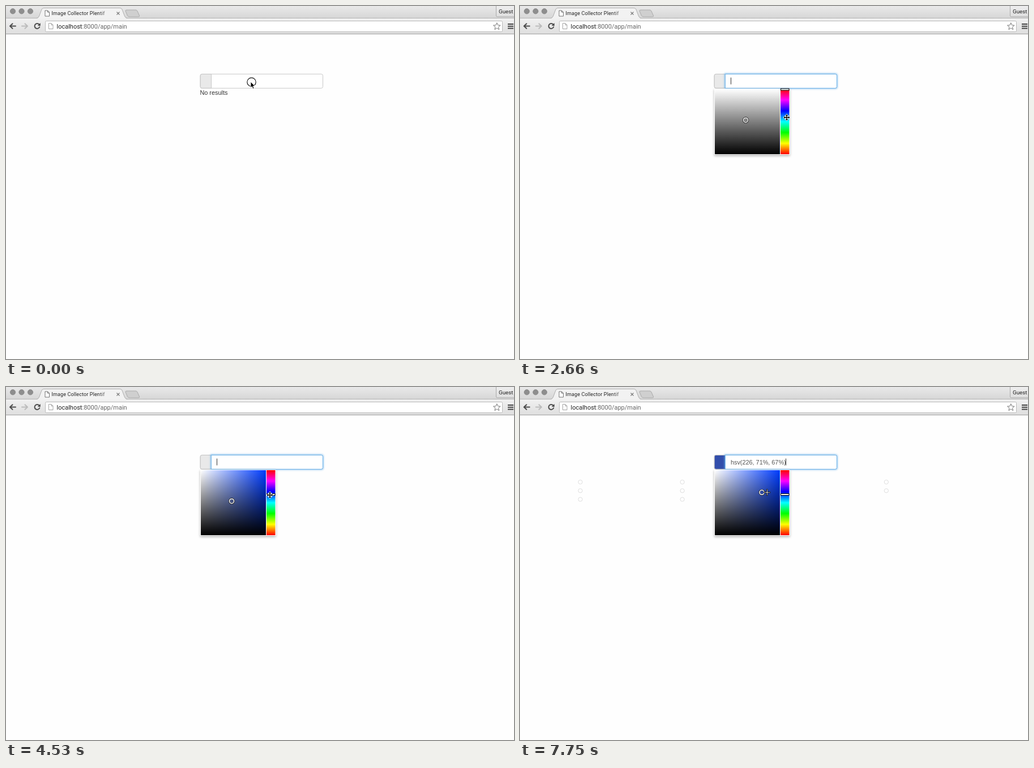
An HTML page that plays this animation: 897 by 624 pixels, repeating every 8000 ms.

```html
<!DOCTYPE html>
<html lang="en">
<head>
<meta charset="utf-8">
<title>Colour search</title>
<style>
html, body { margin: 0; width: 100%; height: 100%; overflow: hidden; background: #fefefe; }
svg { display: block; width: 897px; height: 624px; }
.ui { font-family: Roboto, Inter, sans-serif; }
.page { font: 10.85px "Liberation Sans", Arial, sans-serif; }
.line { fill: none; stroke-linecap: round; stroke-linejoin: round; }
</style>
</head>
<body>
<svg viewBox="0 0 897 624">
  <defs>
    <linearGradient id="strip" x2="0" y2="1"><stop stop-color="#e9e9e9"/><stop offset="1" stop-color="#d6d6d6"/></linearGradient>
    <linearGradient id="bar" x2="0" y2="1"><stop stop-color="#f1f1f1"/><stop offset="1" stop-color="#dedede"/></linearGradient>
    <linearGradient id="fade" gradientUnits="userSpaceOnUse" x1="164" x2="189" y1="0" y2="0"><stop stop-color="#222"/><stop offset="1" stop-color="#222" stop-opacity="0"/></linearGradient>
    <linearGradient id="value" x2="0" y2="1"><stop stop-opacity="0"/><stop offset="1"/></linearGradient>
    <linearGradient id="sat"><stop stop-color="#fff"/><stop id="pure" offset="1" stop-color="#fff"/></linearGradient>
    <linearGradient id="hues" x2="0" y2="1"></linearGradient>
    <filter id="shadow" x="-20%" y="-20%" width="140%" height="140%"><feDropShadow dx="0" dy="2" stdDeviation="2.2" flood-opacity=".3"/></filter>
    <filter id="glow" x="-10%" y="-50%" width="120%" height="200%"><feGaussianBlur stdDeviation="1.7"/></filter>
    <path id="sheet" d="M.5.5H5L8 3.5V10.5H.5ZM5 .5V3.5H8"/>
  </defs>
  <rect width="897" height="624" fill="#fefefe"/>

  <g id="browser" class="ui">
    <rect width="897" height="22" fill="url(#strip)"/>
    <g fill="#8e8e8e" stroke="#7c7c7c" stroke-width=".6"><circle cx="12" cy="9.3" r="4.7"/><circle cx="27.5" cy="9.3" r="4.7"/><circle cx="43" cy="9.3" r="4.7"/></g>
    <path d="M211 9Q210.500 7 213 7H229Q231 7 232 9L235.500 17Q236 19 234 19H218Q215.500 19 214.500 17Z" fill="#cfcfcf" stroke="#a6a6a6" stroke-width=".9"/>
    <rect y="21.500" width="897" height="28" fill="url(#bar)"/>
    <path d="M0 21.500H897" stroke="#b4b4b4"/>
    <path d="M54 22Q57 21.500 58.500 18L63 6Q64 3.500 67 3.500H201Q204 3.500 205 6L209.500 18Q211 21.500 214 22Z" fill="#f2f2f2"/>
    <path d="M54 21.500Q57 21.500 58.500 18L63 6Q64 3.500 67 3.500H201Q204 3.500 205 6L209.500 18Q211 21.500 214 21.500" fill="none" stroke="#a9a9a9" stroke-width=".9"/>
    <use href="#sheet" x="68.500" y="7.500" fill="#fff" stroke="#666" stroke-width=".9"/>
    <text x="80.500" y="16" font-size="9" letter-spacing=".12" fill="url(#fade)">Image Collector Plentif</text>
    <path d="M195.500 10.500L200.500 15.500M200.500 10.500L195.500 15.500" stroke="#777" stroke-width="1.1"/>
    <path d="M0 49.500H897" stroke="#a0a0a0"/>
    <rect x="69.500" y="26.500" width="807" height="19" rx="2" fill="#fff" stroke="#b9b9b9"/>
    <g class="line" stroke-width="2">
      <path d="M17 35.500H7.500M11.500 31.200L7 35.500L11.500 39.800" stroke="#4d4d4d"/>
      <path d="M28 35.500H37.500M33.500 31.200L38 35.500L33.500 39.800" stroke="#bcbcbc"/>
      <path d="M58.500 32.500A4.500 4.500 0 1 0 59.300 37" stroke="#4d4d4d"/>
    </g>
    <path d="M60.800 30V35H55.800Z" fill="#4d4d4d"/>
    <use href="#sheet" x="75" y="30" fill="#fff" stroke="#999" stroke-width=".9"/>
    <text x="89.500" y="39.700" font-size="11" fill="#222">localhost<tspan fill="#666">:8000/app/main</tspan></text>
    <path id="star" fill="#fff" stroke="#777"/>
    <path d="M886 32H896M886 35.800H896M886 39.600H896" stroke="#444" stroke-width="2"/>
    <rect x="865.500" y="-3" width="36" height="22" rx="2" fill="url(#bar)" stroke="#a9a9a9"/>
    <text x="870" y="13.300" font-size="9.800" fill="#222">Guest</text>
  </g>

  <g id="results" fill="#fff" stroke="#dedede"></g>
  <text id="empty" class="page" x="342.500" y="157" fill="#333">No results</text>

  <rect x="343" y="120.300" width="216.500" height="25" rx="3" fill="#fff" stroke="#c8c8c8"/>
  <path id="swatch" d="M362.500 120.500H346Q343.300 120.500 343.300 123V142.500Q343.300 145.200 346 145.200H362.500Z" stroke="#c4c4c4" stroke-width=".9"/>
  <g id="focus">
    <path d="M362.300 120.300H556.500Q559.500 120.300 559.500 123.300V142.300Q559.500 145.300 556.500 145.300H362.300Z" fill="none" stroke="#66afe9" stroke-width="3" opacity=".65" filter="url(#glow)"/>
    <path d="M362.300 120.300H556.500Q559.500 120.300 559.500 123.300V142.300Q559.500 145.300 556.500 145.300H362.300Z" fill="#fff" stroke="#66afe9"/>
  </g>
  <text id="entry" class="page" x="372" y="136.500" fill="#555"></text>
  <path id="caret" stroke="#333"/>

  <g id="picker">
    <rect x="343" y="146" width="133.500" height="117" fill="#fff" filter="url(#shadow)"/>
    <rect x="344" y="147" width="115" height="115" fill="url(#sat)"/>
    <rect x="344" y="147" width="115" height="115" fill="url(#value)"/>
    <rect x="460" y="147" width="15.500" height="115" fill="url(#hues)"/>
    <g id="slider"><rect x="460.500" y="-1.500" width="14.500" height="3" fill="#fff" stroke="#000"/></g>
    <g id="marker" fill="none"><circle r="4.300" stroke="#222" stroke-width="2.600"/><circle r="4" stroke="#fff" stroke-width="1.500"/></g>
  </g>

  <g id="ring" fill="none"><circle r="7.800" stroke="#fff" stroke-width="2.600" opacity=".55"/><circle r="7.700" stroke="#111" stroke-width="1.150"/></g>
  <g id="pointer">
    <path data-kind="arrow" d="M0 0V10.500L2.400 8.300L4.100 12.300L6 11.500L4.300 7.600H7.600Z" fill="#000" stroke="#fff" stroke-width=".8"/>
    <path data-kind="hand" d="M-.9 7V1Q-.9 0 .1 0Q1.200 0 1.200 1V4.700Q2.200 3.900 3.100 4.900Q4.200 4.300 5 5.400Q6.700 5.100 6.800 6.800V9Q6.700 10.500 5.700 11.800V13H-.2V11.800Q-1.800 10 -3 7.500Q-3.500 6.300 -2.400 6.200Q-1.600 6.200 -.9 7.500ZM1.200 4.700V7M3.100 5V7M5 5.500V7.200" fill="#fff" stroke="#000" stroke-width=".9"/>
    <path data-kind="beam" d="M-2.500 -6Q0 -6 0 -4.500Q0 -6 2.500 -6M0 -4.500V4.500M-2.500 6Q0 6 0 4.500Q0 6 2.500 6" fill="none" stroke="#222"/>
    <g data-kind="move">
      <path id="arrows" d="M0 -5.500L2.300 -3H.7V-.7H3V-2.300L5.500 0L3 2.300V.7H.7V3H2.300L0 5.500L-2.300 3H-.7V.7H-3V2.300L-5.500 0L-3 -2.300V-.7H-.7V-3H-2.300Z" fill="#000" stroke="#fff" stroke-width="1.500" paint-order="stroke"/>
    </g>
    <path data-kind="cross" d="M-.8 -5.500H.8V-.8H5.500V.8H.8V5.500H-.8V.8H-5.500V-.8H-.8Z" fill="#fff" stroke="#111" stroke-width=".9"/>
  </g>
</svg>
<script>
const LOOP = 8000;
const $ = id => document.getElementById(id);
const NS = "http://www.w3.org/2000/svg";

function add(parent, tag, attrs) {
  const node = document.createElementNS(NS, tag);
  for (const key in attrs) node.setAttribute(key, attrs[key]);
  parent.append(node);
}

for (let i = 0; i <= 6; i++)
  add($("hues"), "stop", { offset: i / 6, "stop-color": `hsl(${360 - i * 60} 100% 50%)` });

// Eleven results in four columns, filled from top to bottom.
for (let i = 0; i < 11; i++)
  add($("results"), "circle", { cx: 106.5 + 180.1 * Math.floor(i / 3), cy: 168 + 15.3 * (i % 3), r: 3.6 });

$("star").setAttribute("d", "M" + Array.from({ length: 10 }, (_, i) => {
  const r = i % 2 ? 2.9 : 6.6, a = i * Math.PI / 5;
  return `${(866.8 + r * Math.sin(a)).toFixed(2)} ${(36.2 - r * Math.cos(a)).toFixed(2)}`;
}).join("L") + "Z");

// start time, pointer kind, x, y
const moves = [
  [0, "arrow", 432, 134], [800, "arrow", 433, 136],
  [1060, "hand", 350.5, 130.5], [1330, "hand", 355.5, 130.5],
  [1860, "hand", 364.5, 130.5], [2130, "beam", 374, 135],
  [2400, "move", 472, 199], [2660, "move", 471, 197],
  [2930, "move", 473, 200], [3190, "cross", 461, 190],
  [3460, "move", 466, 193], [3730, "move", 466, 191],
  [4800, "cross", 428, 196], [5070, "cross", 413, 204],
  [5340, "cross", 404, 202], [5600, "cross", 401, 201],
  [5870, "cross", 419, 190], [6140, "cross", 423.5, 186.5],
  [7490, "cross", 432, 186], [7750, "cross", 436.3, 186.3]
];

// start, end, x, y
const presses = [
  [0, 260, 433.5, 134.5], [1600, 1860, 357, 129.3], [4000, 4530, 467, 190],
  [5870, 6140, 419, 190], [6140, 7220, 423.5, 186.5]
];

// start, saturation, value, marker x, marker y
const picks = [
  [0, 0, 0, 398.5, 201.7], [5870, 61, 61, 415, 192.3],
  [6140, 67, 65, 421.5, 188], [6680, 69, 66, 423.5, 187], [7490, 71, 67, 427, 186.3]
];

const blinks = [[1600, 2130], [2660, 3190], [3730, 4260], [4530, 5070], [5600, LOOP]];

const latest = (list, t) => list.findLast(item => item[0] <= t);
const during = (list, t) => list.find(([from, to]) => t >= from && t < to);
const show = (node, on) => node.style.display = on ? "" : "none";
const place = (node, x, y) => node.setAttribute("transform", `translate(${x} ${y})`);

function hsv(h, s, v) {
  const channel = n => {
    const k = (n + h / 60) % 6;
    return Math.round(255 * v / 100 * (1 - s / 100 * Math.max(0, Math.min(k, 4 - k, 1))));
  };
  return `rgb(${channel(5)},${channel(3)},${channel(1)})`;
}

function draw(t) {
  const [, kind, x, y] = latest(moves, t);
  place($("pointer"), x, y);
  for (const shape of $("pointer").children) show(shape, shape.dataset.kind === kind);

  const press = during(presses, t);
  show($("ring"), press);
  if (press) place($("ring"), press[2], press[3]);

  const [, s, v, mx, my] = latest(picks, t);
  const picked = t >= 5870, blue = t >= 4530;
  place($("marker"), mx, my);
  place($("slider"), 0, blue ? 190 : 147.5);
  $("pure").setAttribute("stop-color", blue ? hsv(226, 100, 100) : "#fff");
  $("swatch").setAttribute("fill", picked ? hsv(226, s, v) : "#e9e9e9");
  $("entry").textContent = picked ? `hsv(226, ${s}%, ${v}%)` : "";

  show($("caret"), during(blinks, t));
  $("caret").setAttribute("d", `M${picked ? 469.5 : 372.5} 126.500V138.500`);
  show($("picker"), t >= 1600);
  show($("focus"), t >= 1860);
  show($("results"), t >= 7750);
  show($("empty"), t < 7750);
}

const begun = performance.now();
function tick() {
  draw((performance.now() - begun) % LOOP);
  requestAnimationFrame(tick);
}
tick();
</script>
</body>
</html>
```
